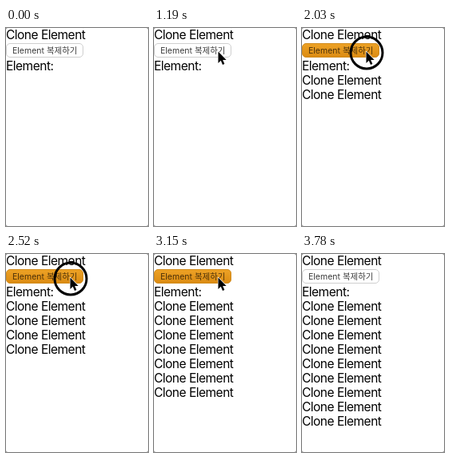
An HTML page that plays this animation: 178x248 px, repeating every 4.41 s.

```html
<!DOCTYPE html>
<html lang="ko">
<head>
<meta charset="utf-8">
<title>Clone Element</title>
<style>
html, body { margin: 0; width: 100%; height: 100%; overflow: hidden; background: #fff; }
svg { display: block; width: 178px; height: 248px; }
.line { font: 15.5px Inter, "Noto Sans", sans-serif; letter-spacing: -0.5px; fill: #000; }
.label { font: 10.5px Inter, "Noto Sans CJK KR", "Noto Sans CJK", sans-serif; fill: #3c3c3c; }
</style>
</head>
<body>
<svg viewBox="0 0 178 248" xmlns="http://www.w3.org/2000/svg">
  <defs>
    <linearGradient id="amber" x1="0" y1="0" x2="0" y2="1">
      <stop offset="0" stop-color="#eda226"/>
      <stop offset="1" stop-color="#db8b12"/>
    </linearGradient>
  </defs>
  <rect width="178" height="248" fill="#8a8a8a"/>
  <rect width="178" height="248" rx="2.5" fill="#fff"/>
  <text class="line" x="0" y="14">Clone Element</text>
  <rect id="button" x="0.5" y="19.5" width="96" height="17" rx="4.5"/>
  <text id="label" class="label" x="8" y="32">Element 복제하기</text>
  <text class="line" x="0" y="53">Element:</text>
  <g id="clones"></g>
  <circle id="ring" cx="81" cy="31" r="20" fill="none" stroke="#000" stroke-width="3"/>
  <path id="cursor" d="M0 0V14.4L3.3 11.3L5.5 16.5L7.9 15.5L5.7 10.4H10.2Z"
    fill="#000" stroke="#fff" stroke-width="1.2" paint-order="stroke" stroke-linejoin="round"/>
</svg>
<script>
const LOOP = 4410, STEP = 70;
const $ = id => document.getElementById(id);
const button = $('button'), label = $('label'), ring = $('ring'), cursor = $('cursor');

// Each click: press, release (adds a clone), then the ring's visible span.
const click = (press, ringOn = press, ringOff = press + 2 * STEP) =>
  ({ press, release: press + STEP, ringOn, ringOff });
const clicks = [
  click(1260), click(1680), click(2030),
  click(2310, 2310, 2380), click(2520, 2520, 2590),
  click(2730), click(2940), click(3150, 3220, 3290), click(3360, 3360, 3430)
];

const clones = clicks.map((_, i) => {
  const line = document.createElementNS('http://www.w3.org/2000/svg', 'text');
  line.setAttribute('class', 'line');
  line.setAttribute('x', 0);
  line.setAttribute('y', 71 + 18 * i);
  line.textContent = 'Clone Element';
  $('clones').append(line);
  return line;
});

const moves = [
  { start: 140, end: 630, from: [155, 76], to: [83, 30], ease: u => 1 - (1 - u) ** 2 },
  { start: 770, end: 980, from: [83, 30], to: [80.5, 29.5], ease: u => u },
  { start: 3430, end: 3570, from: [80.5, 29.5], to: [99, 228], ease: u => u ** 1.3 }
];

function cursorAt(t) {
  const move = moves.filter(m => t >= m.start).pop();
  if (!move || t >= 3640) return null;
  const u = move.ease(Math.min(1, (t - move.start) / (move.end - move.start)));
  return move.from.map((a, i) => a + (move.to[i] - a) * u);
}

const show = (node, on) => node.setAttribute('visibility', on ? 'visible' : 'hidden');

function draw(time) {
  const t = Math.floor((time % LOOP) / STEP) * STEP;
  const pressed = clicks.some(c => t >= c.press && t < c.release);
  button.setAttribute('fill', pressed ? 'url(#amber)' : '#fff');
  button.setAttribute('stroke', pressed ? '#d08a1c' : '#cfcfcf');
  label.style.fill = pressed ? '#4d3209' : '#3c3c3c';
  show(ring, clicks.some(c => t >= c.ringOn && t < c.ringOff));
  clones.forEach((line, i) => show(line, t >= clicks[i].release));

  const tip = cursorAt(t);
  show(cursor, tip);
  if (tip) cursor.setAttribute('transform', `translate(${tip[0]} ${tip[1]})`);
}

const begin = performance.now();
function tick() {
  draw(performance.now() - begin);
  requestAnimationFrame(tick);
}
tick();
</script>
</body>
</html>
```
